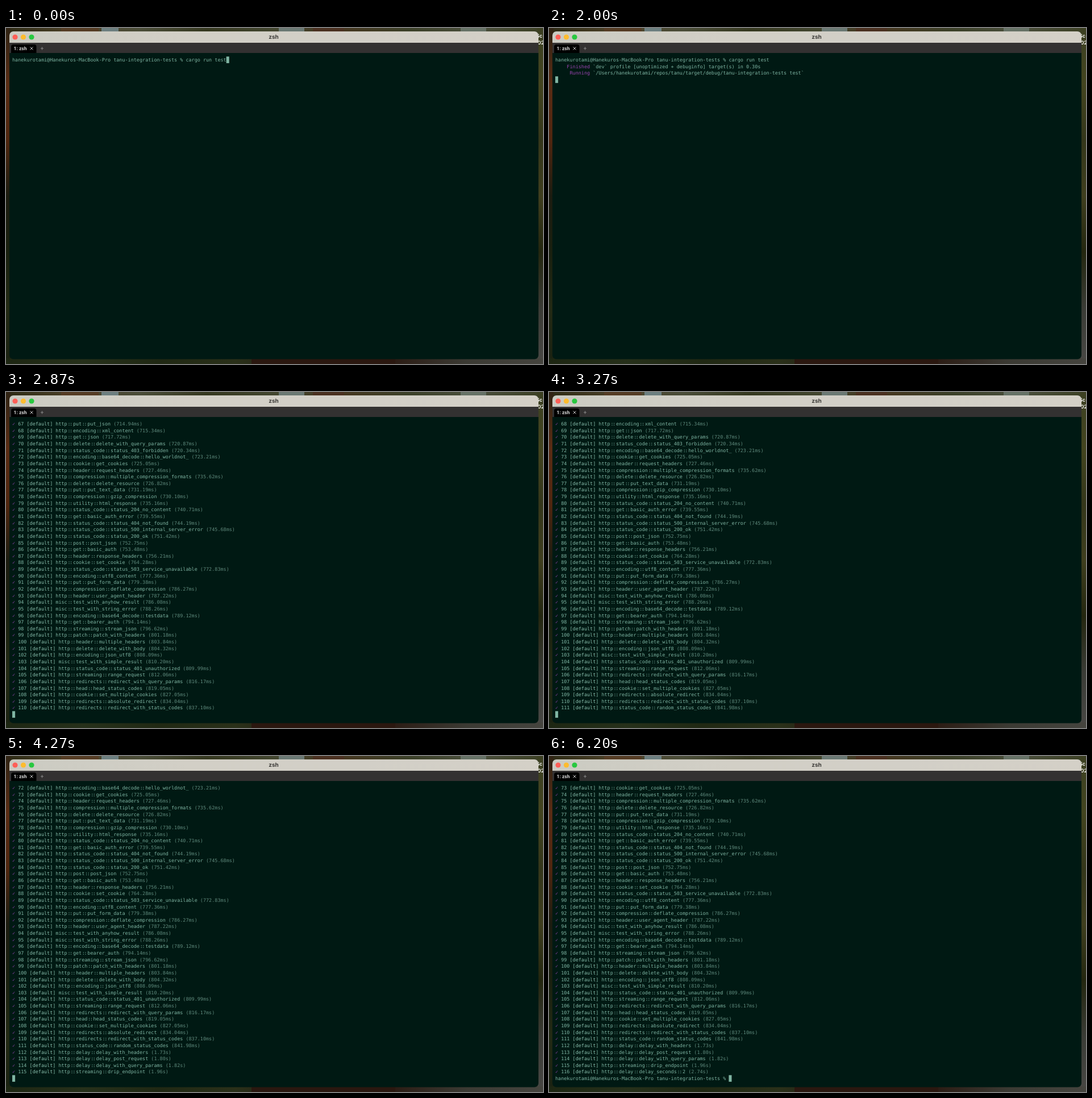
Write an HTML page with a canvas that moves like this. It is 945 px wide and 592 px high and loops after 6.4 s.

```html
<!DOCTYPE html>
<html lang="en">
<head>
<meta charset="utf-8">
<title>zsh</title>
<style>
html, body { margin: 0; width: 100%; height: 100%; overflow: hidden; background: #1c2016; }
canvas { display: block; }
</style>
</head>
<body>
<canvas id="stage" width="945" height="592"></canvas>
<script>
const ctx = document.getElementById('stage').getContext('2d');
ctx.textRendering = 'geometricPrecision';

const LOOP = 6400, ROWS = 45, LEFT = 11, TOP = 50.3, COL = 5.09, ROW = 11.636;
const MONO = '8.45px "DejaVu Sans Mono", monospace';
const SANS = 'Inter, Roboto, sans-serif';
const FG = '#7fb5a3', BRIGHT = '#8abfad', DIM = '#5f8a7d', PURPLE = '#9a44b0', CHECK = '#8040a0';

const PROMPT = 'hanekurotami@Hanekuros-MacBook-Pro tanu-integration-tests % ';
const COMMAND = 'cargo run test';

const tests = `
macros::with_sub_expression::1_sub_1 4.12µs
macros::with_div_expression::1_div_1 2.36µs
assertion::check_ne_basic 18.42µs
macros::with_left_shift_expression::1_lshift_1 1.97µs
macros::with_bitwise_and_expression::1_and_1 2.05µs
assertion::check_basic_false 22.61µs
macros::with_and_expression::true_and_true 1.78µs
macros::with_lt_expression::1_lt_2 2.14µs
macros::with_gt_expression::2_gt_1 1.93µs
assertion::check_eq_integers 14.08µs
macros::with_boolean::false 2.27µs
macros::with_neg_expression::neg_1 1.88µs
macros::with_bitwise_xor_expression::1_xor_1 2.51µs
assertion::check_eq_floats 16.33µs
macros::with_char::a 2.10µs
macros::with_right_shift_expression::1_rshift_1 1.85µs
macros::with_mod_expression::1_mod_1 3.28µs
macros::with_eq_and_and_expression::1_eq_2_and_3_nq_4 6.11µs
assertion::check_basic_true 21.26µs
assertion::check_str_eq_multiline 72.50µs
assertion::check_str_eq_basic 105.29µs
macros::with_and_expression::true_and_false 3.19µs
macros::with_div_and_mul_expression::1_div_2_mul_3 2.99µs
macros::with_bitwise_or_expression::1_or_1 23.59µs
macros::with_boolean::true 7.35µs
macros::with_mul_expression::1_mul_1 1.85µs
macros::with_as_ref::ownedstring_to_string 4.46µs
macros::with_mod_and_add_expression::1_mod_2_add_3 3.12µs
macros::with_to_string::foo_to_string 2.39µs
assertion::check_ne_strings 20.10µs
macros::with_optional_parameters::statuscode_ok 2.69µs
macros::with_into_string::foo 3.05µs
macros::with_eq_expression::1_eq_1 2.97µs
macros::with_add_and_sub_expression::1_add_2_sub_3 1.82µs
http::test_in_mod_rs 2.79µs
assertion::check_boolean_operations 39.59µs
macros::with_float::1_0 3.26µs
macros::with_add_and_mul_expression::1_add_1_mul_2 5.06µs
assertion::check_ne_integers 12.75µs
assertion::check_option_values 62.67µs
macros::without_parameters 2.95µs
macros::with_neq_expression::1_nq_1 2.44µs
assertion::check_with_message 27.56µs
macros::with_as_ref::str 2.01µs
assertion::check_str_eq_whitespace 32.84µs
assertion::check_result_values 28.93µs
macros::with_integer::1 2.01µs
macros::with_add_expression::1_add_1 2.88µs
macros::with_or_expression::true_or_false 1.42µs
macros::with_bitwise_and_or_xor_expression::1_and_2_or_3_xor_4 3.25µs
assertion::check_eq_strings 41.30µs
macros::with_str::foo 3.20µs
macros::with_not_expression::not_true 1.86µs
macros::with_string::foo_to_string 5.02µs
assertion::check_eq_vectors 56.05µs
http::status_code::status_400_bad_request 701.77ms
http::encoding::base64_decode::simpletest 700.05ms
http::utility::ip_address 701.77ms
misc::test_result_types_parameterized::eyre 702.86ms
http::get::get_with_headers 703.41ms
http::utility::uuid_response 704.92ms
http::patch::patch_json 706.15ms
http::post::post_form_data 708.37ms
http::delete::delete_with_headers 709.60ms
http::redirects::relative_redirect 711.28ms
http::header::custom_header 713.02ms
http::put::put_json 714.94ms
http::encoding::xml_content 715.34ms
http::get::json 717.72ms
http::delete::delete_with_query_params 720.87ms
http::status_code::status_403_forbidden 720.34ms
http::encoding::base64_decode::hello_worldnot_ 723.21ms
http::cookie::get_cookies 725.05ms
http::header::request_headers 727.46ms
http::compression::multiple_compression_formats 735.62ms
http::delete::delete_resource 726.82ms
http::put::put_text_data 731.19ms
http::compression::gzip_compression 730.10ms
http::utility::html_response 735.16ms
http::status_code::status_204_no_content 740.71ms
http::get::basic_auth_error 739.55ms
http::status_code::status_404_not_found 744.19ms
http::status_code::status_500_internal_server_error 745.68ms
http::status_code::status_200_ok 751.42ms
http::post::post_json 752.75ms
http::get::basic_auth 753.48ms
http::header::response_headers 756.21ms
http::cookie::set_cookie 764.28ms
http::status_code::status_503_service_unavailable 772.83ms
http::encoding::utf8_content 777.36ms
http::put::put_form_data 779.38ms
http::compression::deflate_compression 786.27ms
http::header::user_agent_header 787.22ms
misc::test_with_anyhow_result 786.08ms
misc::test_with_string_error 788.26ms
http::encoding::base64_decode::testdata 789.12ms
http::get::bearer_auth 794.14ms
http::streaming::stream_json 796.62ms
http::patch::patch_with_headers 801.18ms
http::header::multiple_headers 803.84ms
http::delete::delete_with_body 804.32ms
http::encoding::json_utf8 808.09ms
misc::test_with_simple_result 810.20ms
http::status_code::status_401_unauthorized 809.99ms
http::streaming::range_request 812.06ms
http::redirects::redirect_with_query_params 816.17ms
http::head::head_status_codes 819.05ms
http::cookie::set_multiple_cookies 827.05ms
http::redirects::absolute_redirect 834.04ms
http::redirects::redirect_with_status_codes 837.10ms
http::status_code::random_status_codes 841.98ms
http::delay::delay_with_headers 1.73s
http::delay::delay_post_request 1.80s
http::delay::delay_with_query_params 1.82s
http::streaming::drip_endpoint 1.96s
http::delay::delay_seconds::2 2.74s`.trim().split('\n').map((line, i) => {
  const [name, time] = line.split(' ');
  return [['✓ ', CHECK], [`${i + 1} `, FG], ['[default] ', BRIGHT], [`${name} `, FG], [`(${time})`, DIM]];
});

// A line is a list of [text, colour] runs; the cursor follows the last one.
const log = [
  [[PROMPT + COMMAND, FG]],
  [['    Finished ', PURPLE], ['`dev` profile [unoptimized + debuginfo] target(s) in 0.30s', FG]],
  [['     Running ', PURPLE], ['`/Users/hanekurotami/repos/tanu/target/debug/tanu-integration-tests test`', FG]],
  ...tests
];

// [start in ms, finished lines]
const steps = [
  [0, 0], [930, 1], [2000, 3], [2070, 17], [2130, 31], [2200, 45], [2270, 58],
  [2730, 62], [2800, 91], [2870, 113], [2930, 114], [3800, 115], [3870, 117],
  [4000, 118], [4800, 119], [5000, 119]
];

function gradient(x0, y0, x1, y1, ...colors) {
  const g = ctx.createLinearGradient(x0, y0, x1, y1);
  colors.forEach((c, i) => g.addColorStop(i / (colors.length - 1), c));
  return g;
}

function box(x, y, w, h, fill, radius = 0) {
  ctx.fillStyle = fill;
  ctx.beginPath();
  ctx.roundRect(x, y, w, h, radius);
  ctx.fill();
}

function label(text, x, y, font, color, align = 'left') {
  ctx.font = font;
  ctx.fillStyle = color;
  ctx.textAlign = align;
  ctx.fillText(text, x, y);
}

function drawDesktop() {
  box(0, 0, 945, 592, '#1d2114');
  box(0, 0, 945, 8, gradient(0, 0, 945, 0, '#2c2a14', '#4c4128', '#4a4d38', '#35381f', '#42462f', '#45361f', '#3b4028', '#4a4f3c', '#3c4024'));
  box(97, 0, 66, 8, '#553c24');
  box(168, 0, 30, 8, '#6c7f80');
  box(480, 0, 45, 8, '#6a7873');
  box(540, 0, 55, 8, '#4a3020');
  box(800, 0, 45, 8, '#667266');
  box(0, 0, 8, 592, gradient(0, 0, 0, 592, '#302414', '#5a2c14', '#50260f', '#1c1c10', '#19200f', '#232a14', '#1a2111'));
  box(935, 0, 10, 592, gradient(0, 0, 0, 592, '#3c4022', '#43441f', '#34361a', '#3f3e1e', '#23260f', '#3a3b35', '#484744'));
  box(0, 582, 945, 10, gradient(0, 0, 945, 0, '#1d2612', '#26301a', '#202813', '#2a3019', '#1f1710', '#2a1a12', '#3b3a33', '#45443e'));
  box(432, 582, 253, 10, '#2a170f');
  label('Sc', 933, 17, `600 9px ${SANS}`, '#fff');
  label('02', 935.5, 28.5, `600 9px ${SANS}`, '#fff');
}

function drawWindow() {
  box(6, 6, 931, 577.5, '#001913', 7);
  box(6, 6, 931, 20, gradient(6, 0, 937, 0, '#cbcbc2', '#d2cfc6', '#d2cfc7', '#d4d0c7'), [7, 7, 0, 0]);
  box(6, 26, 931, 18, '#333131');
  box(9, 29, 44.5, 15, '#000', [4, 4, 0, 0]);
  ['#ff5f57', '#febc2e', '#28c840'].forEach((c, i) => box(11.4 + i * 14.5, 11.4, 9.2, 9.2, c, 4.6));
  label('zsh', 471, 19.2, `700 10px ${SANS}`, '#3b3a37', 'center');
  label('1: zsh', 13.5, 39.3, '700 8.6px Roboto, sans-serif', '#ddd');
  ctx.lineWidth = 1;
  ctx.strokeStyle = '#ccc';
  ctx.stroke(new Path2D('M42.5 33.5l5 5m0-5l-5 5'));
  ctx.strokeStyle = '#888';
  ctx.stroke(new Path2D('M61 36h5m-2.5-2.5v5'));
}

function drawLine(runs, row) {
  let col = 0;
  ctx.font = MONO;
  ctx.textAlign = 'left';
  for (const [text, color] of runs) {
    ctx.fillStyle = color;
    [...text].forEach((ch, i) => {
      // Paired colons sit closer together.
      const nudge = ch !== ':' ? 0 : text[i + 1] === ':' ? 0.7 : text[i - 1] === ':' ? -0.7 : 0;
      if (ch !== ' ') ctx.fillText(ch, LEFT + col * COL + nudge, TOP + row * ROW + 8.8);
      col++;
    });
  }
  return col;
}

function draw(start, count) {
  drawDesktop();
  drawWindow();
  const last = start === 0 ? log[0] : start === 5000 ? [[PROMPT, FG]] : [];
  const screen = [...log.slice(0, count), last].slice(-ROWS);
  let col = 0;
  screen.forEach((runs, row) => { col = drawLine(runs, row); });
  box(LEFT + col * COL, TOP + (screen.length - 1) * ROW, COL, ROW, '#80b5a3');
}

let shown;
function frame() {
  const t = performance.now() % LOOP;
  const step = steps.findLast(([start]) => start <= t);
  if (step !== shown) draw(...(shown = step));
  requestAnimationFrame(frame);
}
frame();
</script>
</body>
</html>
```
